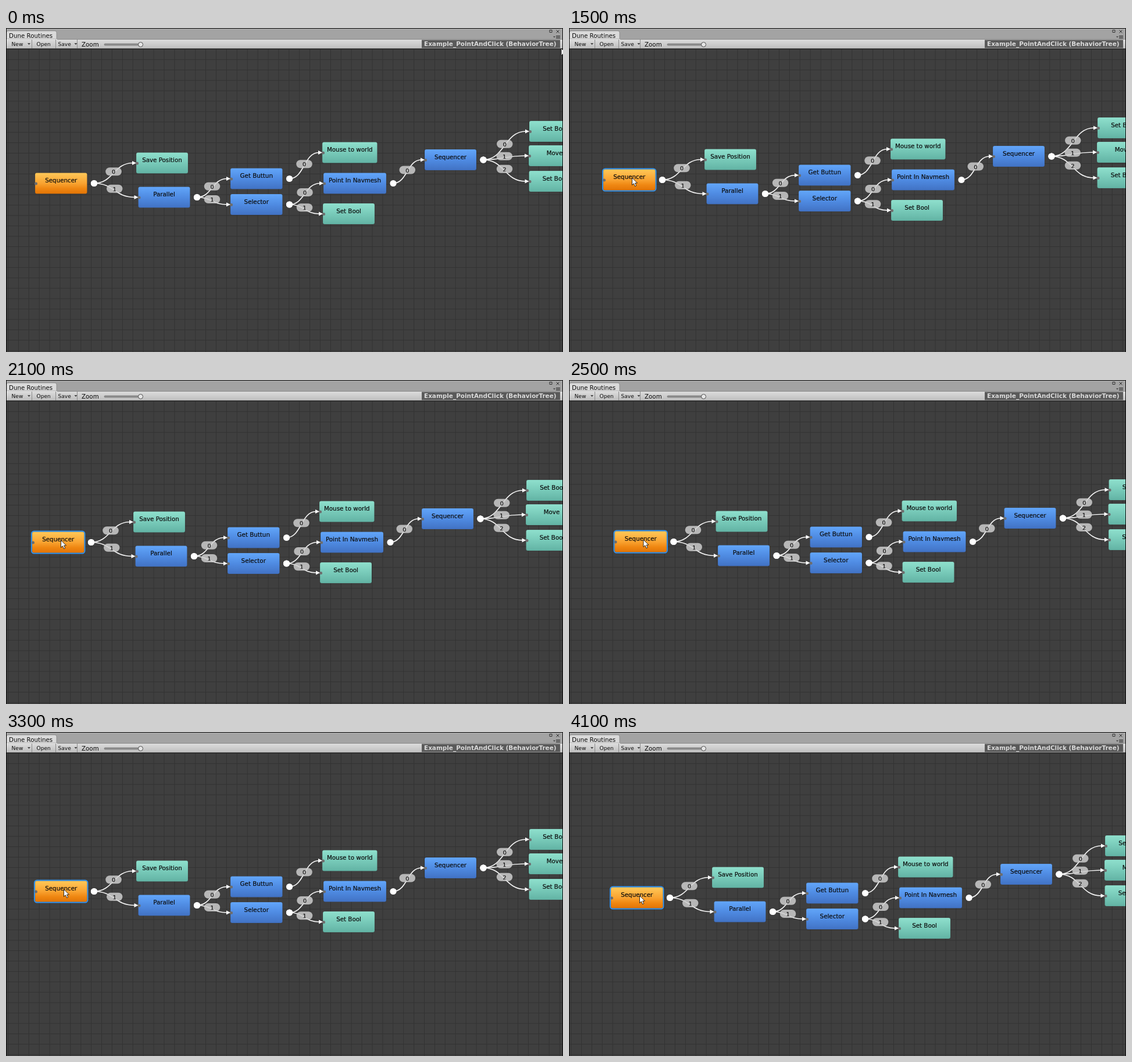
Recreate the animation shown at these times as an HTML page. Size 958x558 px, loop 4200 ms.

```html
<!DOCTYPE html>
<html lang="en">
<head>
<meta charset="utf-8">
<title>Behavior tree editor</title>
<style>
html, body { margin: 0; width: 100%; height: 100%; overflow: hidden; background: #3f3f3f; }
svg { display: block; font: 10.3px "DejaVu Sans", sans-serif; fill: #0c0c0c; }
.label, .digit { text-anchor: middle; stroke: #0c0c0c; stroke-width: .2; }
.digit { font-size: 9.5px; }
.wire { fill: none; stroke: #f4f4f4; stroke-width: 1.7; }
.small { font-size: 9.1px; }
</style>
</head>
<body>
<svg width="958" height="558" viewBox="0 0 958 558">
  <defs>
    <linearGradient id="orange" x2="0" y2="1">
      <stop stop-color="#ffc858"/><stop offset=".5" stop-color="#f9a331"/>
      <stop offset=".75" stop-color="#ef8712"/><stop offset="1" stop-color="#e27405"/>
    </linearGradient>
    <linearGradient id="blue" x2="0" y2="1">
      <stop stop-color="#62a6fa"/><stop offset=".5" stop-color="#4f8be2"/><stop offset="1" stop-color="#4172c4"/>
    </linearGradient>
    <linearGradient id="teal" x2="0" y2="1">
      <stop stop-color="#8fe0cd"/><stop offset=".5" stop-color="#78cab9"/><stop offset="1" stop-color="#62b3a4"/>
    </linearGradient>
    <linearGradient id="bar" x2="0" y2="1">
      <stop stop-color="#dedede"/><stop offset="1" stop-color="#bdbdbd"/>
    </linearGradient>
    <pattern id="grid" x="3" y="36" width="17.9" height="17.9" patternUnits="userSpaceOnUse">
      <path d="M.5 0V17.9M0 .5H17.9" stroke="#323232"/>
    </pattern>
    <filter id="blur" x="-20%" y="-40%" width="140%" height="180%"><feGaussianBlur stdDeviation=".7"/></filter>
  </defs>

  <rect width="958" height="558" fill="#3f3f3f"/>
  <rect y="36" width="958" height="522" fill="url(#grid)"/>
  <g id="tree"></g>

  <rect width="958" height="19" fill="#a3a3a3"/>
  <path d="M1 19V8q0-3 3-3H84q3 0 3 3V19Z" fill="#dadada" stroke="#777" stroke-width=".6"/>
  <text x="5" y="16.6">Dune Routines</text>
  <rect y="19" width="958" height="16.5" fill="url(#bar)"/>
  <path d="M88 19.5H958M44.5 20V35M85.5 20V35M122.5 20V35" stroke="#8b8b8b"/>
  <path d="M0 36H958" stroke="#1c1c1c"/>
  <g class="small">
    <text x="9.5" y="31">New</text><text x="52.5" y="31">Open</text><text x="89.5" y="31">Save</text>
  </g>
  <path d="M37 26h5l-2.5 3ZM117.5 26h5l-2.5 3Z" fill="#444"/>
  <text x="130" y="32">Zoom</text>
  <rect x="169" y="27" width="62" height="3" rx="1.5" fill="#8f8f8f" stroke="#6c6c6c" stroke-width=".6"/>
  <circle cx="231.5" cy="28.5" r="4" fill="#e6e6e6" stroke="#4c4c4c"/>
  <rect x="715" y="20.5" width="238" height="14" fill="#5a5a5a"/>
  <text x="719" y="31" font-weight="bold" font-size="10.45" fill="#dadada">Example_PointAndClick (BehaviorTree)</text>
  <g fill="none" stroke="#333">
    <path d="M935 3.5h4v4h-4ZM946.5 3.5l5 5m0-5l-5 5M946 13.5h7m-7 2h7m-7 2h7"/>
    <path d="M941 14.5h4l-2 2Z" fill="#333" stroke="none"/>
    <path d="M.5 558V.5H957.5V558" stroke="#0c0c0c"/>
  </g>
  <path id="cursor" d="M0 0V12.5L2.9 9.8 5 14.6 7.2 13.6 5.2 9H9Z" fill="#fff" stroke="#000" stroke-width=".8"/>
</svg>
<script>
const tree = document.getElementById('tree');
const cursor = document.getElementById('cursor');
const HEIGHT = 36;

// label, x, y, width, fill, parent index, order among siblings
const nodes = [
  ['Sequencer', 50, 249.5, 89.5, 'orange'],
  ['Save Position', 224, 214.5, 89, 'teal', 0, 0],
  ['Parallel', 227.5, 273.5, 89, 'blue', 0, 1],
  ['Get Buttun', 386, 241.5, 89.5, 'blue', 2, 0],
  ['Selector', 386, 286, 89.5, 'blue', 2, 1],
  ['Mouse to world', 544, 196.5, 94.5, 'teal', 3, 0],
  ['Point In Navmesh', 546, 249.5, 108, 'blue', 4, 0],
  ['Set Bool', 545, 302, 89, 'teal', 4, 1],
  ['Sequencer', 720, 209, 89, 'blue', 6, 0],
  ['Set Bool', 900, 160, 89, 'teal', 8, 0],
  ['Move', 899, 202, 89, 'teal', 8, 1],
  ['Set Bool', 899.5, 246, 89, 'teal', 8, 2]
];

const outlet = ([, x, y, w]) => [x + w + 12, y + 18];

function drawNode([label, x, y, w, fill]) {
  return `<rect x="${x}" y="${y}" width="${w}" height="${HEIGHT}" rx="3" fill="url(#${fill})" stroke="#2b2b2b" stroke-opacity=".25" stroke-width=".6"/>
    <circle cx="${x + 1.5}" cy="${y + 18.5}" r="2.5" fill="#6d6d6d"/>
    <text class="label" x="${x + w / 2}" y="${y + 16.5}">${label}</text>`;
}

function drawLink([, x, y, , , parent, order]) {
  if (parent === undefined) return '';
  const [x1, y1] = outlet(nodes[parent]);
  const x2 = x - 6, y2 = y + 18, mx = (x1 + x2) / 2, my = (y1 + y2) / 2 - 2.7;
  return `<path class="wire" d="M${x1} ${y1}C${mx} ${y1} ${mx} ${y2} ${x2} ${y2}"/>
    <path d="M${x - 7} ${y2 - 3.5}l7 3.5-7 3.5Z" fill="#fff"/>
    <circle cx="${x1}" cy="${y1}" r="5.6" fill="#fff"/>
    <rect x="${mx - 13.5}" y="${my - 7}" width="27.5" height="14" rx="7" fill="#cecece" fill-opacity=".84"/>
    <text class="digit" x="${mx + .3}" y="${my + 4}">${order}</text>`;
}

tree.innerHTML = `<rect id="glow" x="49.2" y="248.7" width="91" height="37.6" rx="4"
    fill="none" stroke="#2f95f5" stroke-width="2.4" filter="url(#blur)"/>` +
  nodes.map(drawNode).join('') + nodes.map(drawLink).join('');
const glow = document.getElementById('glow');

// One point per 100 ms: the pointer's approach, then the circling drag offsets
const approach = [[955, 35], [900, 74], [755, 160], [555, 245], [365, 295],
  [215, 301], [119, 272], [106, 269], [102, 266], [99.5, 264]];
const drag = [[3, -2], [9, -6], [18, -7], [28, 2], [33, 14.5], [24, 20],
  [8, 20], [-5, 12], [-7, -2], [6, -12], [22, -6], [28.5, 11],
  [15, 26], [3, 17], [1, -4], [17, -15], [31, -2], [27, 21],
  [9, 25], [0, 7], [9, -12], [27, -4], [27, 20], [5, 28],
  [3, 11], [12, 0], [23, 5], [22, 18]];

const SELECT = 10, DRAG = 14, STEPS = 42;

function render() {
  const step = Math.floor(performance.now() / 100) % STEPS;
  const [dx, dy] = step < DRAG ? [0, 0] : drag[step - DRAG];
  const [cx, cy] = approach[Math.min(step, approach.length - 1)];
  tree.setAttribute('transform', `translate(${dx} ${dy})`);
  cursor.setAttribute('transform', `translate(${cx + dx} ${cy + dy})`);
  glow.setAttribute('visibility', step < SELECT ? 'hidden' : 'visible');
  requestAnimationFrame(render);
}
render();
</script>
</body>
</html>
```
